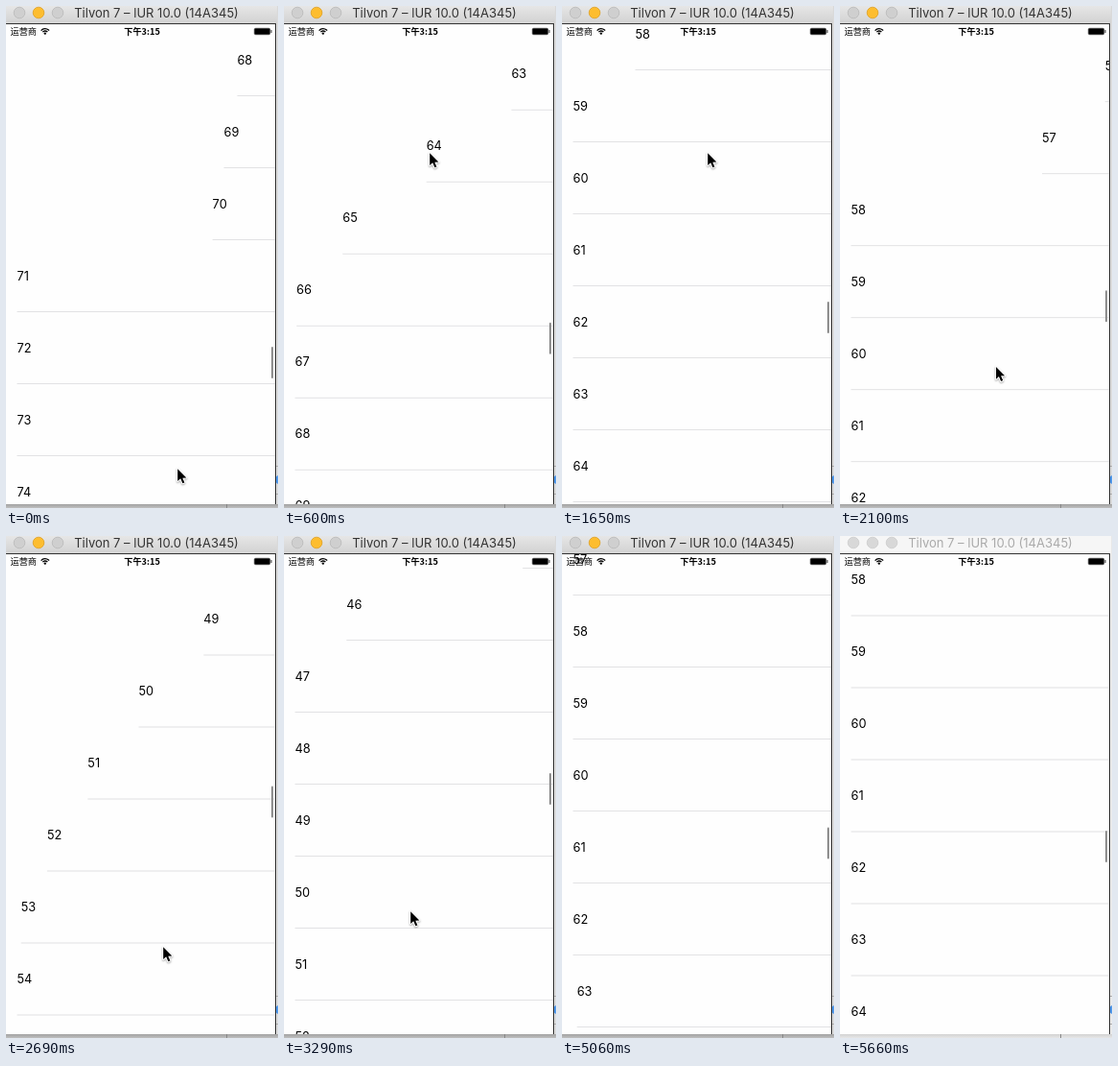
An HTML page with a canvas for the animation above (5760 ms loop, 284 px wide and 523 px high).

```html
<!DOCTYPE html>
<html lang="zh">
<head>
<meta charset="utf-8">
<style>
html, body { margin: 0; width: 100%; height: 100%; overflow: hidden; background: #fff; }
canvas { display: block; width: 284px; height: 523px; }
</style>
</head>
<body>
<canvas id="stage"></canvas>
<script>
const W = 284, H = 523, LOOP = 5760;
const TOP = 18, BOTTOM = 519, EDGE = 281;
const ROW = 75, INSET = 11.5, SLIDE = 500;
const FIRST = 40, LAST = 82, LEAD = 800;
const UI = 'Inter, "Noto Sans", sans-serif';
const CJK = '"Noto Sans CJK SC", "Noto Sans CJK", Inter, sans-serif';

const canvas = document.getElementById('stage');
const ratio = window.devicePixelRatio || 1;
canvas.width = W * ratio;
canvas.height = H * ratio;
const ctx = canvas.getContext('2d');
ctx.scale(ratio, ratio);

// Monotone cubic curve through [time, value] keys
function curve(keys) {
  const n = keys.length, slope = [], tan = [];
  for (let i = 0; i < n - 1; i++)
    slope.push((keys[i + 1][1] - keys[i][1]) / (keys[i + 1][0] - keys[i][0]));
  for (let i = 0; i < n; i++) {
    const a = slope[i - 1], b = slope[i];
    tan.push(a * b > 0 ? 2 * a * b / (a + b) : 0);
  }
  return t => {
    if (t <= keys[0][0]) return keys[0][1];
    if (t >= keys[n - 1][0]) return keys[n - 1][1];
    let i = 0;
    while (keys[i + 1][0] <= t) i++;
    const [t0, v0] = keys[i], [t1, v1] = keys[i + 1];
    const d = t1 - t0, u = (t - t0) / d, w = 1 - u;
    return v0 * (1 + 2 * u) * w * w + tan[i] * d * u * w * w +
      v1 * u * u * (3 - 2 * u) - tan[i + 1] * d * u * u * w;
  };
}

// Three flicks towards lower rows, then one back
const scrollAt = curve([
  [-560, 5340], [-182, 5290], [-137, 5119.5], [0, 5044],
  [707, 4594], [1050, 4440], [1307, 4369], [1650, 4321],
  [1900, 4300], [2225, 3994], [2505, 3694], [2690, 3588.5], [2930, 3469], [3290, 3379],
  [3720, 3640], [3980, 3944], [4330, 4122], [4620, 4211], [5660, 4304.5]
]);

const pointer = [
  [0, 178, 481], [500, 151, 152], [1900, 151, 152], [2240, 168, 505], [2690, 163, 427],
  [3290, 131, 390], [3740, 168, 228], [4330, 168, 228], [4470, 176, 1]
];
const cursorX = curve(pointer.map(([t, x]) => [t, x]));
const cursorY = curve(pointer.map(([t, , y]) => [t, y]));

// The picture advances in ticks of 150 ms, a few of them 140 ms
const SHORT = [14, 28, 29, 37];
const ticks = [0];
for (let i = 0; i < 38; i++) ticks.push(ticks[i] + (SHORT.includes(i) ? 140 : 150));

// Times at which a row comes into view
function findEntries(n) {
  const times = [];
  let seen = false;
  for (let t = -LEAD; t <= LOOP; t += 2) {
    const y = n * ROW - scrollAt(t);
    const inView = y + ROW / 2 > TOP && y - ROW / 2 < BOTTOM;
    if (inView && !seen) times.push(t);
    seen = inView;
  }
  return times;
}
const entries = [];
for (let n = FIRST; n <= LAST; n++) entries[n] = findEntries(n);

function slideOffset(n, t) {
  const entry = Math.max(...entries[n].filter(e => e <= t));
  const u = Math.max(0, Math.min(1, (t - entry) / SLIDE));
  return EDGE * (1 - u * u * (3 - 2 * u));
}

function box(x, y, w, h, fill) {
  ctx.fillStyle = fill;
  ctx.fillRect(x, y, w, h);
}

function pill(x, y, w, h, r, fill) {
  ctx.beginPath();
  ctx.roundRect(x, y, w, h, r);
  ctx.fillStyle = fill;
  ctx.fill();
}

function dot(x, y, r, fill, stroke) {
  ctx.beginPath();
  ctx.arc(x, y, r, 0, 7);
  ctx.fillStyle = fill;
  ctx.fill();
  if (!stroke) return;
  ctx.strokeStyle = stroke;
  ctx.lineWidth = 0.8;
  ctx.stroke();
}

function label(str, x, y, font, fill = '#000', align = 'left') {
  ctx.font = font;
  ctx.fillStyle = fill;
  ctx.textAlign = align;
  ctx.fillText(str, x, y);
}

function fade(y0, y1, from, to) {
  const g = ctx.createLinearGradient(0, y0, 0, y1);
  g.addColorStop(0, from);
  g.addColorStop(1, to);
  return g;
}

function drawDesktop(active) {
  const [near, far] = active ? ['#a2a2a2', '#bebebe'] : ['#d2d2d2', '#e6e6e6'];
  box(0, 0, W, H, active ? '#d9d9d9' : '#e9e9e9');
  box(0, BOTTOM, W, H - BOTTOM, fade(BOTTOM, H, near, far));
  box(230, BOTTOM, 1, H - BOTTOM, '#888');
  box(282, 479, 2, 1, '#aaa');
  box(282, 508, 2, 1, '#aaa');
  dot(286, 493.5, 5, '#4a94e8');
}

function drawTitle(active) {
  box(0, 0, 283, TOP, active ? fade(0, TOP, '#e6e6e6', '#d2d2d2') : '#f6f6f6');
  const [face, rim] = active ? ['#cfcfcf', '#b9b9b9'] : ['#d8d8d8', '#cccccc'];
  dot(14, 7, 5.8, face, rim);
  dot(34, 7, 5.8, active ? '#fdbd2f' : face, active ? '#dfa023' : rim);
  dot(54, 7, 5.8, face, rim);
  label('Tilvon 7 – lUR 10.0 (14A345)', 157, 12, '13px ' + UI, active ? '#333' : '#aaa', 'center');
}

function drawRows(t, s) {
  ctx.save();
  ctx.beginPath();
  ctx.rect(0, TOP, EDGE, BOTTOM - TOP);
  ctx.clip();
  box(0, TOP, EDGE, BOTTOM - TOP, '#fefefe');
  for (let n = FIRST; n <= LAST; n++) {
    const y = n * ROW - s;
    if (y < TOP - ROW || y > BOTTOM + ROW) continue;
    const x = INSET + slideOffset(n, t);
    if (x >= EDGE) continue;
    label(n, x, y + 4.5, '12.75px ' + UI);
    box(x, y + 37, EDGE - x, 1, '#e2e2e4');
  }
  pill(277, 355 + (s - 5044) * 0.0649, 2, 33, 1, '#8e8e8e');
  ctx.restore();
}

function drawStatus() {
  label('运营商', 4.5, 30, '9.2px ' + CJK);
  ctx.strokeStyle = '#000';
  ctx.lineWidth = 1.3;
  for (const r of [3.3, 5.6]) {
    ctx.beginPath();
    ctx.arc(40.8, 29.3, r, -Math.PI * 0.77, -Math.PI * 0.23);
    ctx.stroke();
  }
  dot(40.8, 28.6, 1.2, '#000');
  label('下午3:15', 142, 30, 'bold 9.2px ' + CJK, '#000', 'center');
  pill(258.8, 22.8, 17.4, 7.4, 1.8, '#777');
  pill(259.6, 23.6, 15.8, 5.8, 1, '#000');
  box(276.5, 25, 1, 3, '#333');
}

function drawBorder() {
  box(0, TOP, 282, 1, '#333');
  box(EDGE, TOP, 1, BOTTOM - TOP, '#333');
}

function drawCursor(x, y) {
  ctx.save();
  ctx.translate(x + 1.2, y + 1.3);
  ctx.scale(0.88, 0.88);
  ctx.beginPath();
  [[0, 0], [0, 14.5], [3.4, 11.4], [5.9, 17], [8.2, 16], [5.8, 10.6], [10.4, 10.4]]
    .forEach(p => ctx.lineTo(...p));
  ctx.closePath();
  ctx.lineJoin = 'round';
  ctx.strokeStyle = '#fff';
  ctx.lineWidth = 2.4;
  ctx.shadowColor = 'rgba(0,0,0,.35)';
  ctx.shadowBlur = 2;
  ctx.shadowOffsetY = 1;
  ctx.stroke();
  ctx.shadowColor = 'transparent';
  ctx.fillStyle = '#000';
  ctx.fill();
  ctx.restore();
}

function draw(t) {
  const active = t < 5500;
  drawDesktop(active);
  drawTitle(active);
  drawRows(t, scrollAt(t));
  drawStatus();
  drawBorder();
  if (t < 4600) drawCursor(cursorX(t), cursorY(t));
}

const start = performance.now();
function loop() {
  const t = (performance.now() - start) % LOOP;
  draw(ticks.findLast(tick => tick <= t));
  requestAnimationFrame(loop);
}
loop();
</script>
</body>
</html>
```
